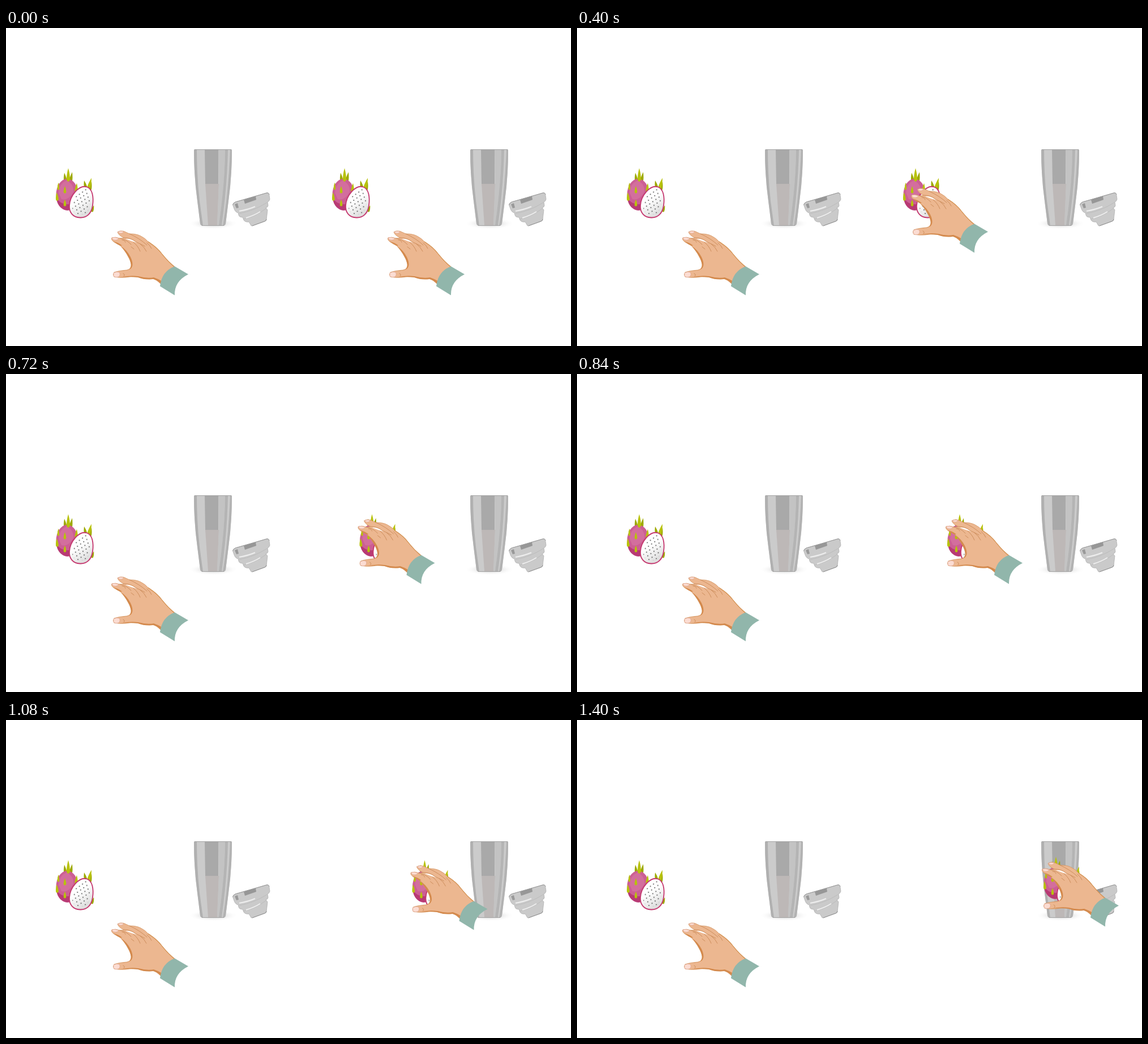
Recreate the animation shown at these times as an HTML page. Size 998 px wide and 561 px high, loop 1440 ms.

```html
<!DOCTYPE html>
<html lang="en">
<head>
<meta charset="utf-8">
<title>Hand, fruit and tumbler</title>
<style>
html, body { margin: 0; width: 100%; height: 100%; overflow: hidden; background: #fff; }
svg { display: block; width: 100vw; height: 100vh; }
</style>
</head>
<body>
<svg viewBox="0 0 998 561">
<defs>
  <radialGradient id="shade">
    <stop offset=".4" stop-color="#e4e4e4"/><stop offset="1" stop-color="#fff" stop-opacity="0"/>
  </radialGradient>
  <linearGradient id="flesh" x1="0" y1="0" x2=".5" y2="1">
    <stop offset=".5" stop-color="#fff"/><stop offset="1" stop-color="#dedede"/>
  </linearGradient>
  <pattern id="seeds" width="8" height="11" patternUnits="userSpaceOnUse" patternTransform="rotate(18)">
    <g fill="#444"><circle cx="2" cy="2.5" r=".95"/><circle cx="6" cy="8" r=".95"/></g>
  </pattern>
  <path id="leaf" d="M-3 0Q-3.500-5 0-13Q3.500-5 3 0Q0 4-3 0Z"/>

  <g id="tumbler">
    <ellipse cx="366" cy="345" rx="44" ry="10" fill="url(#shade)"/>
    <path d="M332 216Q332 214 334 214H397Q399 214 399 216Q399 262 393 305L388 345Q387 349 383 349H348Q344 349 343 345L338 305Q332 262 332 216Z" fill="#cbcbcb"/>
    <path d="M332 216Q332 214 334 214H337Q337 262 342 305L348 349Q344 349 343 345L338 305Q332 262 332 216Z" fill="#b0b0b0"/>
    <path d="M351 214H375V275H352Z" fill="#a9a9a9"/>
    <path d="M352 275H376L373 348H357Z" fill="#bdb8b7"/>
    <path d="M375 214H387Q387 270 376 348H373L376 275Z" fill="#c3c3c3"/>
    <path d="M387 214H392Q391 275 381 348H376Q387 270 387 214Z" fill="#b4b4b4"/>
    <path d="M396 214H397Q399 214 399 216Q399 262 393 305L388 345Q387 349 383 349Q393 290 396 214Z" fill="#b2b2b2"/>
    <path d="M333 214.500H398M346 348.500H385" stroke="#a2a2a2"/>
  </g>

  <g id="lid">
    <path d="M400.500 312Q401 309 405 307L460 291Q465 290 465 295L466 302Q465 306 462 307L463 313Q463 316 459 317L462 321L460 338Q460 340 457 341L435 349Q433 350 432 347L429 342Q423 343 420 339L418 334Q412 334 411 330L410 326Q405 325 403 319Z" fill="#cacaca" stroke="#aaa" stroke-width=".7"/>
    <path d="M400.500 312Q401 309 405 307L460 291Q464 290 465 294" fill="none" stroke="#999"/>
    <path d="M420 303L441 296.500L442 303L422 310Z" fill="#979797"/>
    <path d="M404 311L409 309L411 317L407 318Z" fill="#999"/>
    <path d="M412 327Q437 323 461 308M420 337Q440 333 460 318" fill="none" stroke="#b8b8b8" stroke-width=".8"/>
    <path d="M412 323Q429 320 440 315M424 335Q438 331 449 324" fill="none" stroke="#eee" stroke-width="2"/>
    <path d="M435 349L457 341Q460 340 460 337" fill="none" stroke="#8e8e8e"/>
  </g>

  <g id="fruit">
    <g fill="#9da900">
      <use href="#leaf" transform="translate(105 271) rotate(-7) scale(.9 1.2)"/>
      <use href="#leaf" transform="translate(114 271) rotate(10) scale(.9 1.3)"/>
      <use href="#leaf" transform="translate(94 286) rotate(-6) scale(.8 1)"/>
      <use href="#leaf" transform="translate(141 283) rotate(-12) scale(.9 1.1)"/>
      <use href="#leaf" transform="translate(148 285) rotate(12) scale(.9 1.1)"/>
      <use href="#leaf" transform="translate(152 323) rotate(18) scale(.7 .8)"/>
    </g>
    <ellipse cx="108" cy="294" rx="19.500" ry="28" fill="#cc5e94"/>
    <path d="M88.500 299Q98 316 122 309L120 318Q108 326 96 316Q90 310 88.500 299Z" fill="#b83a74"/>
    <path d="M93 291Q94 274 107 269Q120 275 119 289Q111 305 98 302Z" fill="#d77aa4" opacity=".6"/>
    <g fill="#b8c20b">
      <use href="#leaf" transform="translate(110 268) scale(1 1.6)"/>
      <use href="#leaf" transform="translate(104 290) scale(.75 .85)"/>
      <use href="#leaf" transform="translate(90.500 303) rotate(-4) scale(.8 1)"/>
      <use href="#leaf" transform="translate(104 313) scale(.75 .8)"/>
      <use href="#leaf" transform="translate(124 288) rotate(4) scale(.85 1.1)"/>
      <use href="#leaf" transform="translate(92.500 284) scale(.6 .85)"/>
      <use href="#leaf" transform="translate(146 282) rotate(16) scale(.9 1.4)"/>
    </g>
    <path d="M143 280.500C153 284 155 299 153 313C151 327 143 335 131 334.500C118 334 111 325 112 313C113 296 129 276 143 280.500Z" fill="url(#flesh)" stroke="#c5386f" stroke-width="1.800"/>
    <path d="M142 284C149 287 150 300 148 312C146 323 141 330 131 329C121 328 116 322 117 313C119 299 132 281 142 284Z" fill="url(#seeds)"/>
  </g>

  <g id="hand">
    <path d="M197 360Q201 357 208 358.500L218 363Q231 363 238 367Q246 371 251 377Q267 387 275 398Q286 412 299 422L273 451Q266 444 260 442Q246 444 233 439Q220 438 211 440Q200 441 191 439Q188 435 191 431Q199 428 214 427Q222 425 222 418Q220 408 213 398Q207 389 202 384Q196 381 190 377Q185 373 187 370Q193 368 201 371Q206 371 208 370Q199 366 197 360Z" fill="#ecb790" stroke="#d3945f" stroke-width=".8"/>
    <path d="M202 384Q214 392 220 404Q227 419 220 425Q211 429 200 429Q213 428 218 425Q224 419 216 404Q210 392 202 384Z" fill="#d48a4d"/>
    <path d="M200 440Q218 436 234 438Q248 442 261 440Q270 443 276 447L273 451Q266 444 260 443Q246 445 233 440Q219 438 200 440Z" fill="#d48a4d"/>
    <path d="M189 376Q200 379 205 384L202 384Q196 381 189 376Z" fill="#d48a4d"/>
    <path d="M211 372Q219 371 227 376L232 379Q224 377 219 375Q214 373 211 372Z" fill="#fff"/>
    <g fill="none" stroke="#c58350" stroke-width=".8" stroke-linecap="round">
      <path d="M201 371Q213 373 221 382M208 370Q221 370 229 377Q240 382 245 385M218 363Q236 371 249 383"/>
      <path d="M225 378Q233 384 237 394M237 381Q245 387 248 394M249 379Q255 384 257 389M205 374Q210 374 211 378M221 386L226 390M207 433Q211 435 208 438"/>
    </g>
    <path d="M251 377Q267 387 275 398Q286 412 298 422" fill="none" stroke="#d3914f" stroke-width="1.200"/>
    <g fill="#fbdcd2" stroke="#d99a83" stroke-width=".6">
      <path d="M187 370Q192 368 199 371Q197 375 191 374Q188 374 187 370Z"/>
      <path d="M197 360Q202 357 208 359Q206 363 201 362Z"/>
      <path d="M190 432Q196 429 200 431Q203 435 199 439Q194 441 190 438Z"/>
    </g>
    <path d="M298 420.500L322 434.500Q297 447 298 471.500L272 455.500Q275 429 298 420.500Z" fill="#91b6ab"/>
  </g>
</defs>

<use href="#tumbler"/><use href="#lid"/><use href="#fruit"/><use href="#hand"/>
<g transform="translate(488)">
  <use href="#tumbler"/><use href="#lid"/>
  <use id="movingFruit" href="#fruit"/>
  <use id="movingHand" href="#hand"/>
</g>
</svg>
<script>
const LOOP = 1440, STEP = 40, GRAB = 520;
// [time, x, y]
const reach = [[0, 0, 0], [240, -47, -37.5], [400, -84, -75], [GRAB, -101, -101]];
const carry = [[GRAB, 0, 0], [560, 8, 0], [600, 19, 0], [840, 78, 0], [1080, 141.5, 0],
  [1120, 155, 0], [1400, 248, -6]];

function along(keys, t) {
  if (t <= keys[0][0]) return [0, 0];
  const i = keys.findIndex(key => key[0] >= t);
  if (i < 0) return keys[keys.length - 1].slice(1);
  const [t0, x0, y0] = keys[i - 1], [t1, x1, y1] = keys[i];
  const p = (t - t0) / (t1 - t0);
  return [x0 + (x1 - x0) * p, y0 + (y1 - y0) * p];
}

function place(id, x, y) {
  document.getElementById(id).setAttribute("transform", `translate(${x} ${y})`);
}

function draw() {
  const t = Math.floor(performance.now() % LOOP / STEP) * STEP;
  const [hx, hy] = along(reach, t), [fx, fy] = along(carry, t);
  place("movingHand", hx + fx, hy + fy);
  place("movingFruit", fx, fy);
  requestAnimationFrame(draw);
}
draw();
</script>
</body>
</html>
```
